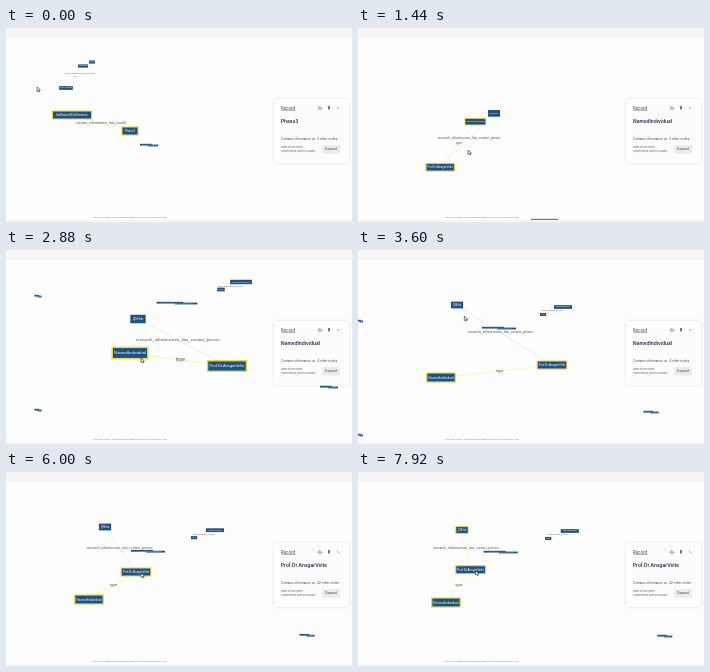
Write an HTML page with a canvas that moves like this. It is 346 by 194 pixels and loops after 8000 ms.

```html
<!DOCTYPE html>
<html lang="en">
<head>
<meta charset="utf-8">
<title>Knowledge graph explorer</title>
<style>
html, body { margin: 0; width: 100%; height: 100%; overflow: hidden; background: #fdfdfd; }
canvas { display: block; width: 346px; height: 194px; }
</style>
</head>
<body>
<canvas id="stage"></canvas>
<script>
const W = 346, H = 194, LOOP = 8000, STEP = 80;
const BLUE = '#1f5082', YELLOW = '#e9d93c';
const SANS = '"Liberation Sans", Arial, sans-serif', UI = 'Inter, sans-serif';
// Camera moves: approach, dive in, pull out and turn, pan to rest.
const APPROACH = 640, NEAR = 1440, CLOSE = 2080, WIDE = 2880, REST = 3600;
// The person node is picked up, dropped, and the graph settles.
const GRAB = 5040, DROP = 6000, END = 7920;

const canvas = document.getElementById('stage');
const dpr = window.devicePixelRatio || 1;
canvas.width = W * dpr;
canvas.height = H * dpr;
const ctx = canvas.getContext('2d');

const lerp = (a, b, p) => a + (b - a) * p;
const mix = (a, b, p) => a.map((v, i) => lerp(v, b[i], p));
function ease(t, from, to) {
  const p = Math.min(1, Math.max(0, (t - from) / (to - from)));
  return p * p * (3 - 2 * p);
}

// Poses are [x, y, height].
function approach([x, y, s], t) {
  const p = ease(t, APPROACH, NEAR), zoom = 1 + 1.07 * p;
  return [x * zoom - 42 * p, y * zoom + 15 * p, s * zoom];
}

// Far objects slide in while the camera pans, then drift outwards.
function distant([x, y, s], t) {
  const left = 2 - ease(t, CLOSE, WIDE) - ease(t, WIDE, REST);
  const drift = ease(t, REST, END);
  return [x + 30 * left + (x - 120) * 0.08 * drift, y - 25 * left + 2 * drift, s * (1 + 0.2 * left)];
}

function visit({ start, close, wide, rest, drag = 0 }, t) {
  if (t < NEAR) return approach(start, t);
  if (t < CLOSE) return mix(approach(start, NEAR), close, ease(t, NEAR, CLOSE));
  if (t < WIDE) return mix(close, wide, ease(t, CLOSE, WIDE));
  const [x, y, s] = mix(wide, rest, ease(t, WIDE, REST));
  const settle = ease(t, DROP, END);
  const pull = drag * (ease(t, GRAB, DROP) + 0.35 * settle);
  return [x + 5 * settle - 64 * pull, y + 3 * settle - 15 * pull, s];
}

function passBy({ start, rest }, t) {
  if (t < NEAR) return approach(start, t);
  return t < 2480 ? null : distant(rest, t);
}

const person = {
  text: 'Prof.Dr.AnsgarVelte', ratio: 3.7, pose: visit, drag: 1, lit: t => t > APPROACH,
  start: [60, 60, 3.7], close: [238, 280, 25], wide: [221, 116, 10.5], rest: [194, 115, 8]
};
const lab = {
  text: 'QNHub', ratio: 1.8, pose: visit, lit: t => t > 6500,
  start: [86, 34, 3.2], close: [199.5, 47.5, 16], wide: [132, 69, 8.5], rest: [99, 55, 6.8]
};
const individual = {
  text: 'NamedIndividual', ratio: 3.15, pose: visit, lit: t => t > APPROACH,
  start: [77, 38, 3.2], close: [124, 103, 16], wide: [124, 103, 11.3], rest: [83, 127.5, 9]
};
const material = {
  text: 'bsMaterialIDsElements', ratio: 4.9, pose: passBy, lit: t => t < NEAR,
  start: [66, 87, 8], rest: [205, 57, 3.7]
};
const phase = {
  text: 'Phase3', ratio: 2, pose: passBy, lit: t => t < NEAR,
  start: [124, 103, 8], rest: [185, 64.5, 3.1]
};
const nodes = [material, phase, lab, individual, person];
const links = [
  [lab, person, 'research_infrastructure_has_contact_person', lab.lit],
  [individual, person, 'type', individual.lit],
  [material, phase, 'contain_information_has_model', material.lit]
];

function clustersAt(t) {
  if (t < NEAR) return [approach([143, 117, 18], t)];
  if (t < 1760) return [];
  if (t < 2480) return [[146, 166, 28], [260, 46, 10]];
  return [[141, 78, 34], [293, 162, 15], [2, 71, 6], [2, 185, 6]].map(c => distant(c, t));
}

function pointerAt(t) {
  const [x, y] = person.pose(person, t);
  const stops = [[0, 31, 59], [APPROACH, 77, 38], [NEAR, 110, 122], [CLOSE, 163, 134],
    [WIDE, 135, 108], [3920, 98, 54], [4560, 98, 54], [GRAB - STEP, x + 5, y + 1]];
  const i = stops.findIndex(s => s[0] > t);
  if (i < 0) return [x + 5, y + 1];
  const a = stops[i - 1], b = stops[i];
  return mix(a, b, ease(t, a[0], b[0])).slice(1);
}

function rect(x, y, w, h, color) {
  ctx.fillStyle = color;
  ctx.fillRect(x, y, w, h);
}

function text(str, x, y, size, color, family = UI, align = 'left', weight = 400) {
  ctx.font = `${weight} ${size}px ${family}`;
  ctx.textAlign = align;
  ctx.textBaseline = align === 'center' ? 'middle' : 'alphabetic';
  ctx.fillStyle = color;
  ctx.fillText(str, x, y);
}

function path(points, color, width) {
  ctx.beginPath();
  points.forEach(([x, y]) => ctx.lineTo(x, y));
  ctx.strokeStyle = color;
  ctx.lineWidth = width;
  ctx.stroke();
}

function drawLinks(t) {
  const labels = [];
  for (const [from, to, name, lit] of links) {
    const a = from.pose(from, t), b = to.pose(to, t);
    if (!a || !b) continue;
    // The middle of a link in perspective lies closer to its far end.
    const [x, y] = mix(a, b, a[2] / (a[2] + b[2]));
    const size = (a[2] + b[2]) / 2;
    path([a, b], lit(t) ? '#faf7c4' : '#efefef', size * 0.14);
    labels.push([name, x, y, size * 0.445]);
  }
  for (const [name, x, y, s] of labels) text(name, x, y, s, '#505050', SANS, 'center');
}

function drawClusters(t) {
  for (const [x, y, w] of clustersAt(t)) {
    rect(x - w / 2, y - 1.2, w * 0.65, 1.8, BLUE);
    rect(x - w * 0.05, y - 0.4, w * 0.55, 1.8, BLUE);
    rect(x - w * 0.42, y - 0.1, w * 0.8, 0.35, '#a9bfd4');
  }
}

function drawNodes(t) {
  for (const n of nodes) {
    const pose = n.pose(n, t);
    if (!pose) continue;
    const [cx, cy, h] = pose, w = h * n.ratio;
    rect(cx - w / 2, cy - h / 2, w, h, BLUE);
    if (n.lit(t)) {
      ctx.strokeStyle = YELLOW;
      ctx.lineWidth = Math.min(1.6, h * 0.13);
      ctx.strokeRect(cx - w / 2, cy - h / 2, w, h);
    }
    text(n.text, cx, cy + h * 0.02, h * 0.38, '#fff', SANS, 'center');
  }
}

function drawPanel(t) {
  ctx.shadowColor = 'rgba(0,0,0,.13)';
  ctx.shadowBlur = 3 * dpr;
  rect(268, 71, 75, 64, '#fcfcfc');
  ctx.shadowBlur = 0;
  text('Record', 275, 81.5, 4.2, '#333');
  rect(275, 82.3, 14.5, 0.4, '#555');
  path([[312.5, 81], [312.5, 79.5], [314, 78.5], [315.5, 80], [315.5, 81], [312.5, 81]], '#555', 0.6);
  rect(322.2, 78, 1.6, 3, '#555');
  path([[323, 81], [323, 82]], '#555', 0.6);
  path([[331, 79], [333, 81]], '#777', 0.6);
  const shown = t < 720 ? phase : t < 4080 ? individual : t < GRAB ? lab : person;
  text(shown.text, 275, 94.6, 4.8, '#28264a', UI, 'left', 600);
  text(`Contains information on: ${shown === person ? 42 : 4} other nodes`, 275, 112, 3.05, '#444');
  text('Want to see more', 275, 119.5, 2.6, '#555');
  text('connections stored in Scan?', 275, 124, 2.6, '#555');
  ctx.beginPath();
  ctx.roundRect(316, 117, 18, 8.5, 1);
  ctx.fillStyle = '#ebebed';
  ctx.fill();
  text('Expand', 325, 121.3, 3.3, '#444', UI, 'center');
}

function drawPointer(t) {
  const [x, y] = pointerAt(t);
  ctx.beginPath();
  [[0, 0], [0, 4.4], [1.1, 3.5], [1.9, 5], [2.7, 4.6], [2, 3.1], [3.4, 3]]
    .forEach(([dx, dy]) => ctx.lineTo(x + dx, y + dy));
  ctx.closePath();
  ctx.fillStyle = '#fff';
  ctx.fill();
  ctx.strokeStyle = '#222';
  ctx.lineWidth = 0.6;
  ctx.stroke();
}

function draw(t) {
  ctx.setTransform(dpr, 0, 0, dpr, 0, 0);
  rect(0, 0, W, H, '#fdfdfd');
  drawLinks(t);
  drawClusters(t);
  drawNodes(t);
  rect(0, 0, W, 10, '#f5f5f5');
  rect(0, 192, W, 2, '#f5f5f5');
  text('Left-click: rotate, Mouse-wheel/middle-click: zoom, Right-click: pan', 87, 189.5, 2.5, '#777', SANS);
  if (t >= 1200 && t < 1760) rect(173, 190.8, 27, 1.2, '#777');
  drawPanel(t);
  drawPointer(t);
}

const begin = performance.now();
function tick() {
  const t = (performance.now() - begin) % LOOP;
  draw(Math.floor(t / STEP) * STEP);
  requestAnimationFrame(tick);
}
tick();
</script>
</body>
</html>
```
